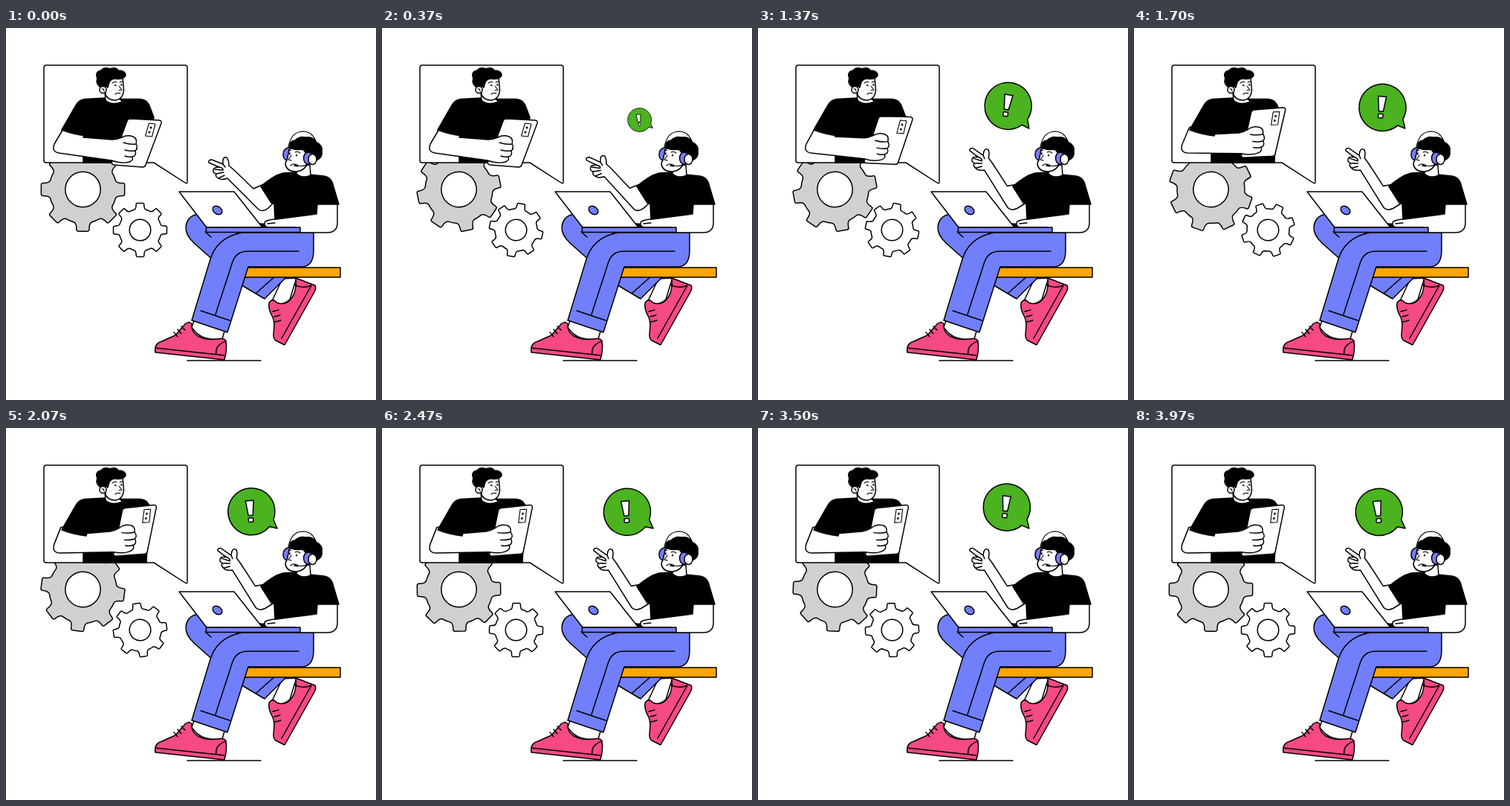
These frames come from a looping animation (498 by 500 pixels, 4.01 s). An HTML page:

```html
<!DOCTYPE html>
<html lang="en">
<head>
<meta charset="utf-8">
<title>Remote support</title>
<style>
html, body { margin: 0; width: 100%; height: 100%; overflow: hidden; background: #fff; }
svg { display: block; width: 498px; height: 500px; }
.line { fill: none; }
.ink { fill: #000; }
.blue { fill: #727ffa; }
.pink { fill: #f54a84; }
.thin { stroke-width: 1.1; }
</style>
</head>
<body>
<svg viewBox="0 0 498 500" fill="#fff" stroke="#000" stroke-width="1.5" stroke-linejoin="round" stroke-linecap="round">
  <g transform="translate(103.5 217)"><g id="bigGear">
    <path fill="#d0d0d0"/><circle r="23.7"/>
  </g></g>
  <g transform="translate(180.5 271.5)"><g id="smallGear">
    <path/><circle r="14.3"/>
  </g></g>

  <!-- video call panel -->
  <path d="M54 50H241Q244 50 244 53V207Q244 210 241 208L199 181H54Q51 181 51 178V53Q51 50 54 50Z"/>
  <path class="ink" d="M75 137L94 104Q98 96 107 95.500L134 94L158 95.500H180Q189 96 192.500 103L199 120L190 160L189 181H104V140Z"/>
  <path d="M133 86L134 97Q142 105 157 99L151 94Z"/>
  <path d="M134 78V90Q139 98 148 97Q158 95 158.500 83L157 66H140Z"/>
  <path class="ink" d="M126 79Q120 73 123 68Q119 59 128 57Q132 52 140 55Q148 52 151 57Q161 57 161 64Q157 70 147 68Q139 69 138 76L137 80L133 77L130 80Z"/>
  <circle cx="130.500" cy="83" r="4.600"/>
  <g class="line thin">
    <path d="M129 82Q132 81 132 85M143 74Q146 71 149 73M153 73L157 72M152 78L156 83L152 84M147 89Q150 86 154 88"/>
    <path stroke-width="2.200" d="M147 77H147.500M155 76.500H155.500"/>
  </g>
  <g id="holder">
    <path d="M168 122L206 124Q210 124.500 209 128L188 184Q187 187 184 187L145 184Q141 183 143 179L163 125Q164 122 168 122Z"/>
    <path class="thin" d="M192.500 128L201 129L196.500 146L187.500 145Z"/>
    <path class="line" stroke-width="2.800" d="M195 134V134.200M193 140V140.200"/>
    <path d="M78 134L65 156Q61 166 71 168L142 178Q157 183 166 180Q172 178 170 173Q176 172 174 165Q178 162 175 156Q177 148 171 146Q163 143 156 147Q149 150 143 150L104 147L106 136Z"/>
    <path class="line" d="M158 154Q167 157 175 156M160 164Q167 166 174 165M160 172Q165 174 170 173"/>
  </g>
  <path class="ink" d="M75 137L94 104L118 100L108 145Q91 143 75 137Z"/>

  <!-- far leg, bench -->
  <path d="M372 337L358 367Q368 376 382 365L391 336Z"/>
  <path class="pink" d="M390 336L416 346Q418 349 415 355L375 426L363 420Q360 418 360 412L361 399Q361 392 357 385Q353 376 354 370Q356 365 361 366Q367 373 378 369Q392 360 390 336Z"/>
  <path class="line" d="M411 346L371 417M388 345Q399 351 411 346M359 381L367 379M361 388L369 386M362 395L370 393"/>
  <path class="blue" d="M266 249Q243 250 242 268Q242 279 253 289L316 345L348 364L377 335L320 280Z"/>
  <path class="line" d="M337 356L362 334M268 274L276 281"/>
  <path fill="#ffa500" d="M322 322H450V335H320Z"/>

  <!-- near leg -->
  <path d="M255 388L250 402Q262 422 291 418L295 404Z"/>
  <path class="pink" d="M201 436Q199 424 210 421L228 413L241 398Q247 393 250 398Q249 408 258 414Q271 420 283 418Q295 416 296 421Q298 431 294 446Z"/>
  <path class="line" d="M201 430L294 440M283 439Q281 426 296 421M226 409L231 415M231 405L236 411M236 401L241 406"/>
  <path d="M244 447H343"/>
  <path class="blue" d="M318 275H414V299Q414 321 397 321H326L298 409L250 393L274 314Q283 281 318 275Z"/>
  <path class="line" d="M262 380L301 393M282 385L305 314Q310 300 326 300H394"/>

  <!-- agent -->
  <g id="pointer">
    <path d="M306 190L300 185Q300 177 297 174Q293 173 292 177V183L277 177Q272 177 273 181L287 187Q279 187 279 191Q278 195 283 196Q281 200 286 202Q290 205 298 202L321 225L340 244Q346 248 353 242L364 231L349 209L333 216Z"/>
    <path class="line" d="M287 187Q293 188 292 191L281 190M283 196L293 194M286 202L294 198M292 183L295 187"/>
  </g>
  <path class="ink" d="M343 213Q360 198 373 195L391 194L409 197L428 199Q436 200 439 207L448 237H419V254L362 258L361 236L357 235Z"/>
  <path d="M392 186L391 196Q400 203 410 198L409 184Z"/>
  <path d="M381 162L376 183Q378 193 390 193Q404 192 407 178L403 160Z"/>
  <path class="line" stroke-width="1.200" d="M380 161Q383 139 400.500 139Q417 140 420 164"/>
  <path class="ink" d="M382 160Q381 152 389 151Q395 145 404 147Q414 146 417 153Q427 158 425 166Q427 173 418 178L403 171Q404 164 397 163Q387 165 382 160Z"/>
  <path class="blue" d="M382 160Q373 162 373 170Q373 176 378 178Z"/>
  <ellipse class="blue" cx="407" cy="175" rx="6.500" ry="8"/>
  <ellipse cx="412.500" cy="176.500" rx="5.500" ry="7"/>
  <g class="line thin">
    <path d="M380 165L384 164M389 167Q393 165 396 168M384 171L380 177L384 178M383 185Q387 181 391 184M392 185Q402 187 407 182"/>
    <path stroke-width="3" d="M389 184.500L392 185"/>
    <path id="eyesOpen" stroke-width="2.200" d="M382 168.500V169M391 171V171.500"/>
    <path id="eyesShut" d="M380 169H384M388.500 171H393"/>
  </g>

  <!-- laptop -->
  <path class="ink" d="M341 263L362 264V269H341Z"/>
  <path d="M419 237H446V262Q446 275 432 275H390V268H352Q346 265 349 260Q355 257 364 257L418 250Z"/>
  <path class="line" d="M352 263L362 262"/>
  <path d="M233 220H307L345 268H270Z"/>
  <ellipse class="blue" cx="284.500" cy="245" rx="7" ry="5" transform="rotate(38 284.500 245)"/>
  <rect class="blue" x="269.500" y="268" width="126.500" height="6.500"/>

  <!-- alert, origin at the tail tip -->
  <g id="alert">
    <path fill="#4bb220" d="M-9.200 -2.200L1 1L-3.200 -11A31.600 31.600 0 1 0 -9.200 -2.200Z"/>
    <path d="M-39 -39H-28L-30.500 -19H-36.500Z"/>
    <rect x="-36.800" y="-15.500" width="6.500" height="5.500" rx="1.500"/>
  </g>
</svg>
<script>
const LOOP = 4010, TURN = 3970, SWAY = 1830, SWAY_LOW = 470;
const el = id => document.getElementById(id);
const set = (id, value) => el(id).setAttribute('transform', value);
const ramp = (t, from, to) => Math.min(1, Math.max(0, (t - from) / (to - from)));
const ease = (t, from, to) => {
  const p = ramp(t, from, to);
  return p * p * (3 - 2 * p);
};

// Eight teeth with flared feet and rounded tips
function gearPath(inner, outer) {
  let d = '';
  for (let tooth = 0; tooth < 8; tooth++) {
    const at = (offset, r) => {
      const a = (tooth * 45 + offset) * Math.PI / 180;
      return `${(r * Math.cos(a)).toFixed(2)} ${(r * Math.sin(a)).toFixed(2)} `;
    };
    const body = `A${inner} ${inner} 0 0 1 `;
    const top = outer - 2;
    d += (tooth ? body : 'M') + at(-15, inner)
      + `Q${at(-10.5, inner + 1)}${at(-9, top)}Q${at(-8.8, outer)}${at(-6.5, outer)}`
      + `L${at(6.5, outer)}Q${at(8.8, outer)}${at(9, top)}Q${at(10.5, inner + 1)}${at(15, inner)}`;
    if (tooth === 7) d += body + at(30, inner) + 'Z';
  }
  return d;
}

el('bigGear').firstElementChild.setAttribute('d', gearPath(45.5, 56.5));
el('smallGear').firstElementChild.setAttribute('d', gearPath(28.5, 36.2));

function draw(t) {
  const spin = 360 * t / TURN;
  set('bigGear', `rotate(${spin})`);
  set('smallGear', `rotate(${-spin})`);
  set('pointer', `rotate(${13 * ease(t, 100, 1050)} 350 225)`);
  set('holder', `rotate(${-9 * ease(t, 1150, 1900)} 72 160)`);

  const tilt = 1.6 - 8.2 * Math.cos(2 * Math.PI * (t - SWAY_LOW) / SWAY);
  const grow = ease(t, 220, 520);
  el('alert').style.display = grow ? '' : 'none';
  set('alert', `translate(364 134) rotate(${tilt}) scale(${grow})`);

  const shut = t > 1530 && t < 1700;
  el('eyesOpen').style.display = shut ? 'none' : '';
  el('eyesShut').style.display = shut ? '' : 'none';
}

const start = performance.now();
function tick() {
  draw((performance.now() - start) % LOOP);
  requestAnimationFrame(tick);
}
tick();
</script>
</body>
</html>
```
